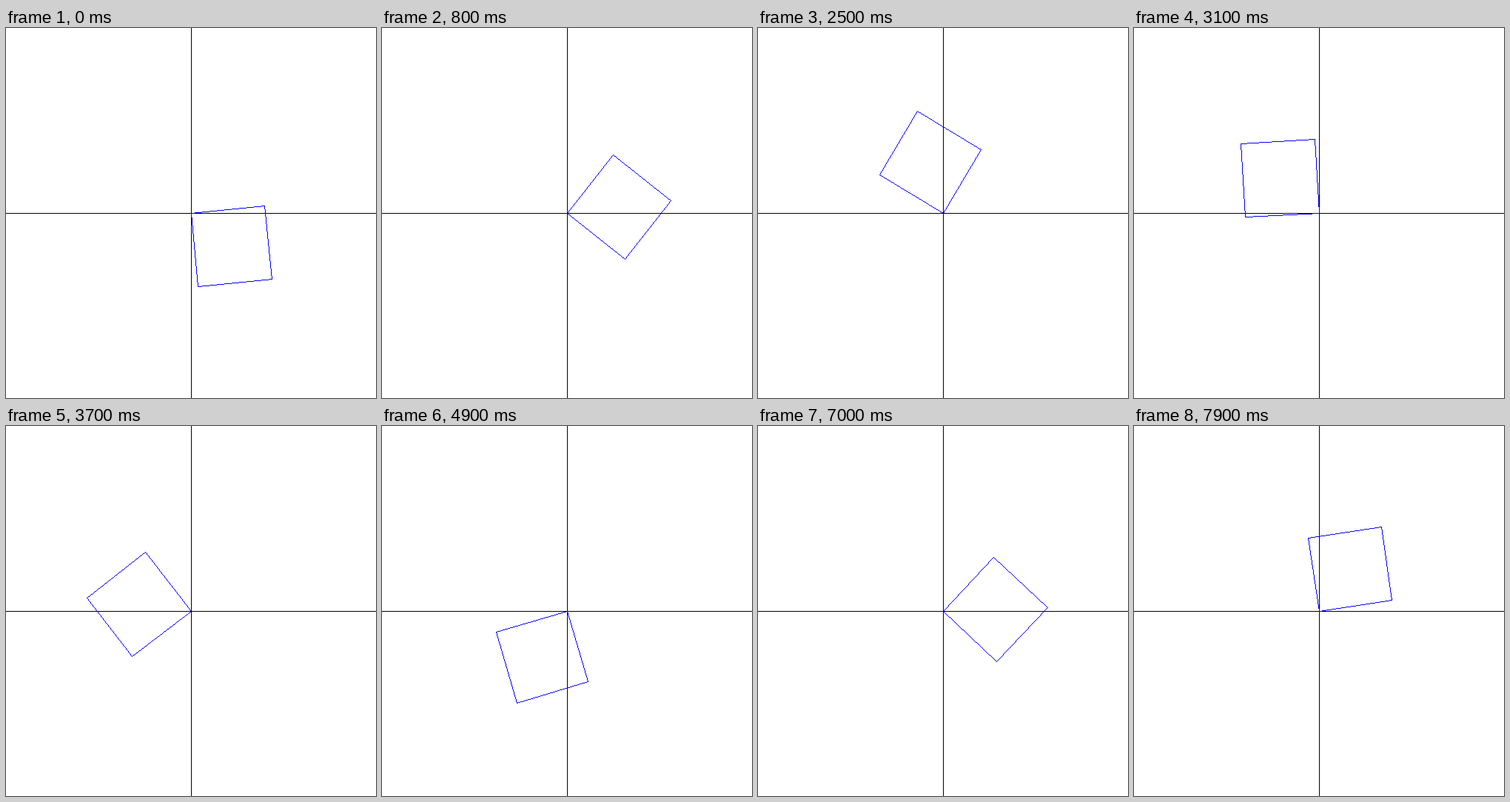
Animation of 500 by 500 pixels, one loop 8 s. Source, as an HTML page with a canvas:

```html
<!DOCTYPE html>
<html lang="en">
<head>
<meta charset="utf-8">
<title>Square turning about the origin</title>
<style>
  html, body { margin: 0; width: 100%; height: 100%; overflow: hidden; background: #fff; }
  canvas { display: block; width: 500px; height: 500px; image-rendering: pixelated; }
</style>
</head>
<body>
<canvas id="stage" width="500" height="500"></canvas>
<script>
const ctx = document.getElementById('stage').getContext('2d');
const SIZE = 500, MID = 250, SIDE = 100;
const STEP_MS = 100, STEPS = 80, TURN = 0.1;
let shown = -1;

// Bresenham line, so the edges stay one hard pixel wide.
function line([x, y], [x1, y1]) {
  const dx = Math.abs(x1 - x), dy = Math.abs(y1 - y);
  const sx = Math.sign(x1 - x), sy = Math.sign(y1 - y);
  const steep = dy > dx;
  const long = Math.max(dx, dy), short = Math.min(dx, dy);
  let err = 2 * short - long;
  for (let i = 0; i <= long; i++) {
    ctx.fillRect(x, y, 1, 1);
    if (err >= 0) {
      if (steep) x += sx; else y += sy;
      err -= 2 * long;
    }
    err += 2 * short;
    if (steep) y += sy; else x += sx;
  }
}

function draw(step) {
  const angle = (step + 1) * TURN;
  const c = SIDE * Math.cos(angle), s = SIDE * Math.sin(angle);
  const corners = [[0, 0], [c, -s], [c + s, c - s], [s, c]]
    .map(p => p.map(v => Math.floor(MID + v)));

  ctx.fillStyle = '#fff';
  ctx.fillRect(0, 0, SIZE, SIZE);
  ctx.fillStyle = '#000';
  ctx.fillRect(0, MID, SIZE, 1);
  ctx.fillRect(MID, 0, 1, SIZE);
  ctx.fillStyle = '#00f';
  corners.forEach((p, i) => line(p, corners[(i + 1) % 4]));
}

function tick() {
  const step = Math.floor(performance.now() / STEP_MS) % STEPS;
  if (step !== shown) draw(shown = step);
  requestAnimationFrame(tick);
}
tick();
</script>
</body>
</html>
```
